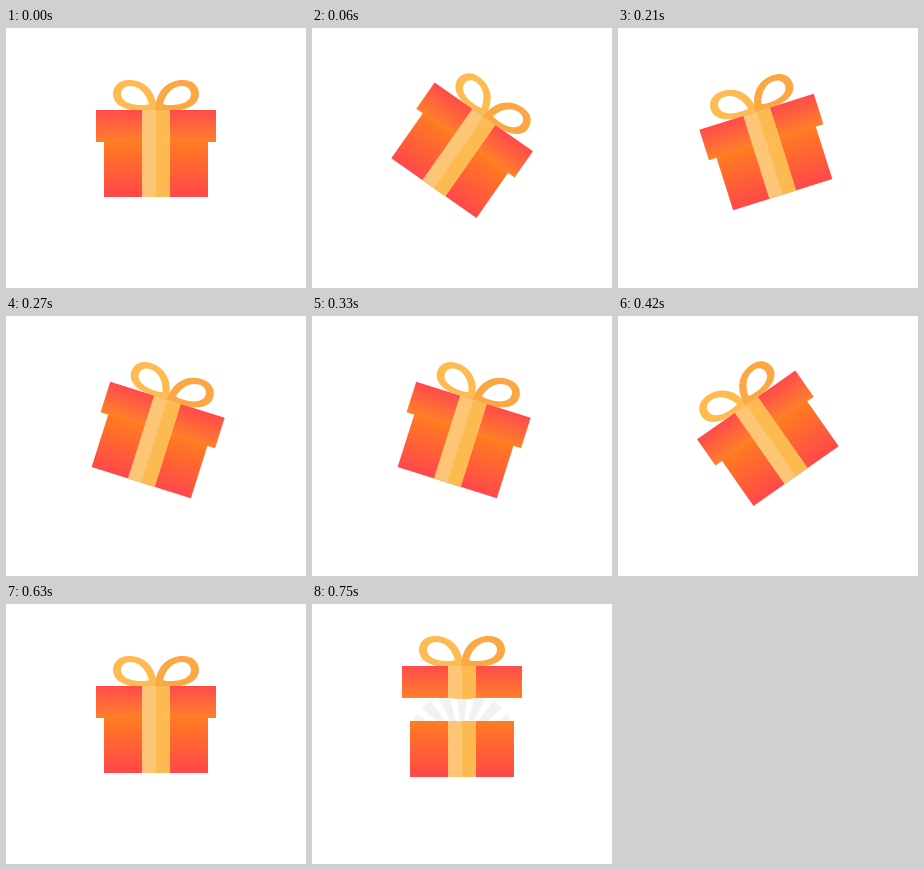
Animation, 300 px wide and 260 px high, one loop 1050 ms. Source, as an HTML page:

```html
<!DOCTYPE html>
<html lang="en">
<head>
<meta charset="utf-8">
<title>Gift box</title>
<style>
  html, body { margin: 0; width: 100%; height: 100%; overflow: hidden; background: #fff; }
  svg { display: block; width: 300px; height: 260px; }
</style>
</head>
<body>
<svg viewBox="0 0 300 260">
  <defs>
    <linearGradient id="lidFill" x2="0" y2="1">
      <stop stop-color="#ff4b4b"/><stop offset="1" stop-color="#ff8029"/>
    </linearGradient>
    <linearGradient id="bodyFill" x2="0" y2="1">
      <stop stop-color="#ff7c20"/><stop offset="1" stop-color="#ff484a"/>
    </linearGradient>
    <path id="loop" fill-rule="evenodd" d="M151 82C150 62 138 52 123 52C112 52 107 59 107 66C107 76 118 82 130 82Z
      M143 76C140 65 133 58 124 58C118 58 115 62 115 66C115 73 124 77 134 77C138 77 141 77 143 76Z"/>
  </defs>
  <g id="gift">
    <path id="rays" fill="#f2f2f2"/>
    <g id="body">
      <rect x="98" y="113" width="104" height="56" fill="url(#bodyFill)"/>
      <rect x="136" y="113" width="28" height="56" fill="#fdc676"/>
      <rect x="150" y="113" width="14" height="56" fill="#fdba50"/>
    </g>
    <g id="lid">
      <use href="#loop" fill="#fdbb52"/>
      <use href="#loop" fill="#fba844" transform="matrix(-1 0 0 1 300 0)"/>
      <rect x="90" y="82" width="120" height="32" fill="url(#lidFill)"/>
      <path d="M136 82H164V114Q150 116 136 114Z" fill="#fdc676"/>
      <path d="M150 82H164V114Q157 115 150 115Z" fill="#fdba50"/>
    </g>
  </g>
</svg>
<script>
  const LOOP = 1050, STEP = 30, SWING = 35, SHAKE_END = 480;
  const $ = id => document.getElementById(id);
  const move = (id, value) => $(id).setAttribute('transform', value);

  // Fan of wedges, hidden until the lid lifts
  const rim = deg => {
    const a = deg * Math.PI / 180;
    return `${150 + 54 * Math.sin(a)} ${140 - 54 * Math.cos(a)}`;
  };
  $('rays').setAttribute('d', [-3, -2, -1, 0, 1, 2, 3]
    .map(i => `M150 140L${rim(i * 21 - 6)}L${rim(i * 21 + 6)}Z`).join(''));

  // Triangle wave: 0, 1, 0, -1 over one 240 ms period
  const triangle = t => 1 - Math.abs(((t + 60) % 240) / 60 - 2);

  function draw(now) {
    const t = Math.floor((now % LOOP) / STEP + 0.01) * STEP;
    const angle = t < SHAKE_END ? SWING * triangle(t) : 0;
    const open = Math.min(1, Math.max(0, (t - 660) / 90));
    move('gift', `rotate(${angle} 150 120)`);
    move('lid', `translate(0 ${-20 * open})`);
    move('body', `translate(0 ${4 * open})`);
    $('rays').style.display = open ? '' : 'none';
  }

  const start = performance.now();
  function frame(now) {
    draw(Math.max(0, now - start));
    requestAnimationFrame(frame);
  }
  draw(0);
  requestAnimationFrame(frame);
</script>
</body>
</html>
```
